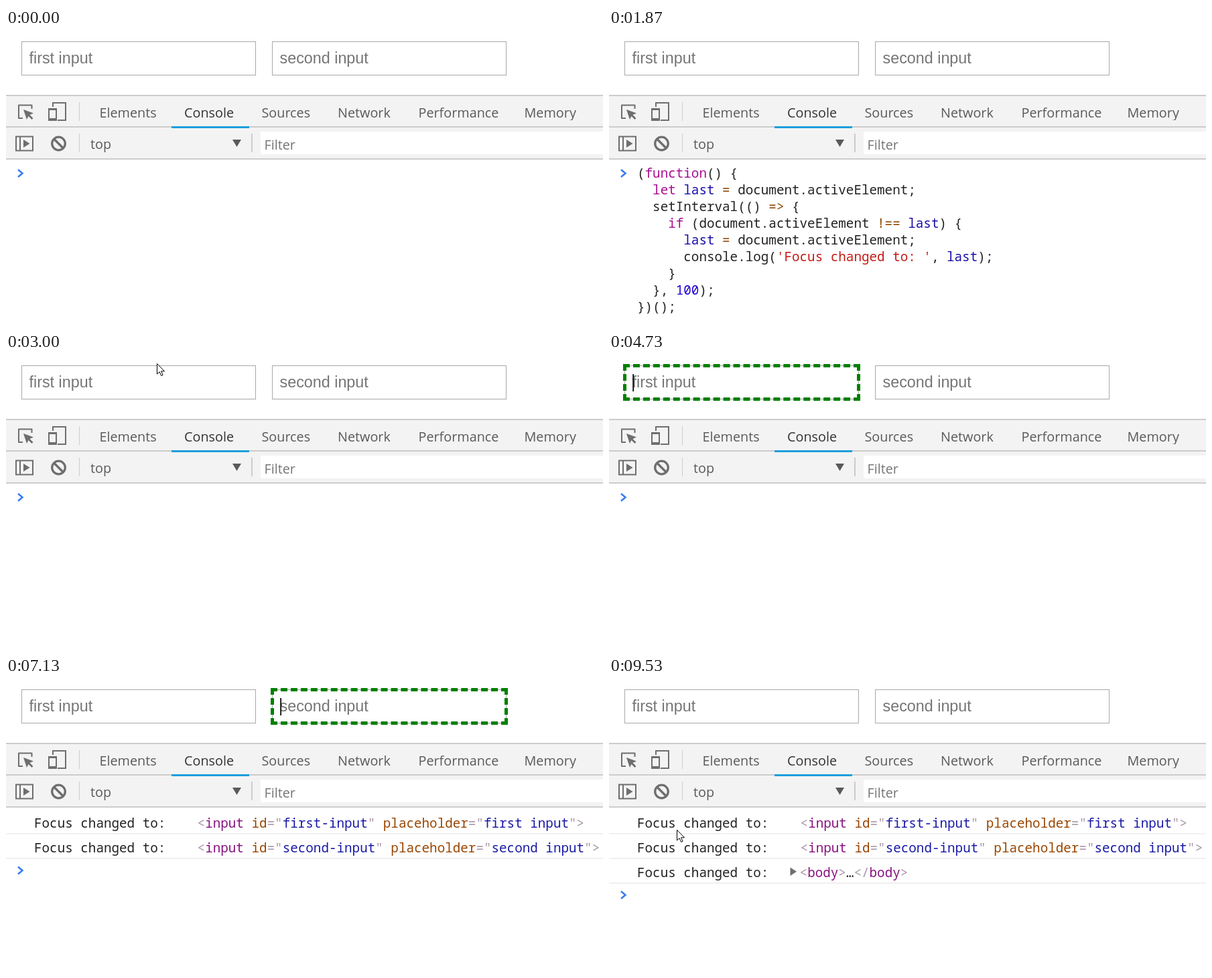
Recreate the animation shown at these times as an HTML page with a canvas. Size 891x443 px, loop 9.67 s.

```html
<!DOCTYPE html>
<html lang="en">
<head>
<meta charset="utf-8">
<title>Logging focus changes in the console</title>
<style>
  html, body { margin: 0; width: 100%; height: 100%; overflow: hidden; background: #fff; }
  canvas { display: block; }
</style>
</head>
<body>
<canvas id="stage" width="891" height="443"></canvas>
<script>
const ctx = document.getElementById('stage').getContext('2d');
const LOOP = 9670, TICK = 200 / 3;
const MONO = '19.25px "Noto Sans Mono", "DejaVu Sans Mono", monospace';
const UI = '19.8px "Open Sans", "Noto Sans", sans-serif';
const FIELD = '23.33px "Liberation Sans", Arial, sans-serif';
const CHAR = 11.55, LINE = 25, ROW = 36.75;

// Token colours, picked by a one-letter key
const INK = {
  d: '#222', k: '#aa0d91', o: '#8f4600', v: '#1a0fa8', n: '#1c00cf', s: '#c41a16',
  t: '#881280', p: '#a894a6', a: '#994500', q: '#1a1aa6'
};

const CODE = [
  [0, 'd(', 'kfunction', 'd() {'],
  [2, 'klet', 'v last', 'o =', 'd document.activeElement;'],
  [2, 'dsetInterval(() ', 'o=>', 'd {'],
  [4, 'kif', 'd (document.activeElement ', 'o!==', 'v last', 'd) {'],
  [6, 'vlast', 'o =', 'd document.activeElement;'],
  [6, 'dconsole.log(', "s'Focus changed to: '", 'd, ', 'vlast', 'd);'],
  [4, 'd}'],
  [2, 'd}, ', 'n100', 'd);'],
  [0, 'd})();']
];

const inputTag = name => [
  'p<', 'tinput', 'a id', 'p="', 'q' + name + '-input', 'p"',
  'a placeholder', 'p="', 'q' + name + ' input', 'p">'
];
const LOGS = [
  { at: 4800, x: 285.6, tag: inputTag('first') },
  { at: 6200, x: 285.6, tag: inputTag('second') },
  { at: 7400, x: 284.6, tag: ['p<', 'tbody', 'p>', 'd…', 'p</', 'tbody', 'p>'], arrow: true }
];

// Spans during which each blinking caret is lit
const BLINK = {
  prompt: [[800, 1330], [3130, 3670], [4200, 4730]],
  code: [[1330, 1870]],
  first: [[4730, 5330], [5800, 6130]],
  second: [[6130, 6670], [7130, 7330]]
};

const within = (t, a, b) => t >= a && t < b;
const lit = (t, name) => BLINK[name].some(([a, b]) => within(t, a, b));

function rect(x, y, w, h, color) {
  ctx.fillStyle = color;
  ctx.fillRect(x, y, w, h);
}

function text(str, x, y, font, color) {
  ctx.font = font;
  ctx.fillStyle = color;
  ctx.fillText(str, x, y);
}

function tokens(list, x, y) {
  for (const item of list) {
    const str = item.slice(1);
    text(str, x, y, MONO, INK[item[0]]);
    x += str.length * CHAR;
  }
}

function path(points, close) {
  ctx.beginPath();
  points.forEach(([x, y]) => ctx.lineTo(x, y));
  if (close) ctx.closePath();
}

function fillPath(points, color) {
  path(points, true);
  ctx.fillStyle = color;
  ctx.fill();
}

function strokePath(points, color, width, close) {
  path(points, close);
  ctx.strokeStyle = color;
  ctx.lineWidth = width;
  ctx.stroke();
}

function frame(x, y, w, h, color, width) {
  ctx.strokeStyle = color;
  ctx.lineWidth = width;
  ctx.strokeRect(x, y, w, h);
}

function chevron(x, y, color) {
  strokePath([[x, y - 5.5], [x + 6.5, y], [x, y + 5.5]], color, 2.5);
}

// Evenly spaced dashes that begin and end on the corners
function dashes(length, place) {
  const size = 10, count = Math.round((length + 5) / 15);
  const step = (length - size) / (count - 1);
  for (let i = 0; i < count; i++) place(i * step, size);
}

function focusRing(x, y, w, h) {
  const green = '#008000', b = 5;
  dashes(w, (d, s) => {
    rect(x + d, y, s, b, green);
    rect(x + d, y + h - b, s, b, green);
  });
  dashes(h, (d, s) => {
    rect(x, y + d, b, s, green);
    rect(x + w - b, y + d, b, s, green);
  });
}

function drawField(x, label, focused, caret) {
  frame(x + 0.5, 20.5, 349, 50, '#a9a9a9', 1);
  text(label, x + 11.5, 53, FIELD, '#757575');
  if (focused) focusRing(x - 2, 18, 354, 55);
  if (caret) rect(x + 12.3, 33, 1.7, 26, '#000');
}

function drawIcons() {
  const c = '#6e6e6e', bar = '#f3f3f3';
  // element picker
  ctx.lineJoin = 'round';
  strokePath([[25, 135], [19, 135], [19, 115.5], [38.5, 115.5], [38.5, 121]], c, 2);
  ctx.lineJoin = 'miter';
  fillPath([[26, 122], [41, 127.5], [35.5, 130], [40.5, 135], [38.5, 137], [33.5, 132], [31, 137]], c);
  // device toggle
  frame(70, 112, 19, 26, c, 2);
  rect(62, 118, 15, 22, bar);
  rect(63, 120, 13, 19, c);
  rect(65, 123, 9, 12, bar);
  // sidebar toggle
  frame(15, 162.5, 25, 21, c, 2);
  rect(20, 162, 2, 22, c);
  fillPath([[26, 167], [35.5, 173], [26, 179]], c);
  // clear
  ctx.beginPath();
  ctx.arc(78.5, 173, 9.8, 0, 7);
  ctx.strokeStyle = c;
  ctx.lineWidth = 3.3;
  ctx.stroke();
  strokePath([[72, 166.5], [85, 179.5]], c, 3.3);
}

function drawToolbars(t) {
  rect(0, 100, 891, 97, '#f3f3f3');
  if (within(t, 8330, 8400)) rect(873, 102, 18, 46, '#e8e8e8');
  for (const y of [100, 147, 195]) rect(0, y, 891, 2, '#cccccc');
  if (within(t, 8330, 8400)) rect(873, 147, 18, 1, '#e8e8e8');
  rect(247, 147, 116, 3, '#1a9fdc');
  rect(109, 111, 1, 28, '#ccc');
  rect(109, 158, 1, 28, '#ccc');
  rect(366, 158, 2, 28, '#ccc');
  rect(380, 155, 511, 34, '#fff');
  drawIcons();

  ctx.save();
  ctx.beginPath();
  ctx.rect(0, 102, 891, 36);
  ctx.clip();
  const tabs = { Elements: 139.5, Console: 266, Sources: 381.5, Network: 495, Performance: 615.5, Memory: 773.5 };
  for (const name in tabs) text(name, tabs[name], 134, UI, name === 'Console' ? '#333' : '#5a5a5a');
  ctx.restore();

  text('top', 126, 181, UI, '#5a5a5a');
  text('Filter', 385.5, 182, UI, '#757575');
  fillPath([[338, 167], [351, 167], [344.5, 178]], '#5a5a5a');
}

function drawCode(dy) {
  CODE.forEach(([indent, ...list], i) => tokens(list, 42 + indent * CHAR, 224 + dy + i * LINE));
}

function drawConsole(t) {
  if (within(t, 1330, 2070)) {
    chevron(18, 217.5, '#367cf1');
    drawCode(0);
    if (lit(t, 'code')) rect(100, 405, 1, 25, '#000');
    return;
  }
  if (within(t, 2070, 3000)) {
    const dy = t < 2130 ? 3 : -3;
    chevron(15, 217.5 + dy, '#9a9a9a');
    drawCode(dy);
    if (t >= 2130) text('undefined', 42, 458, MONO, '#808080');
    return;
  }
  const shown = LOGS.filter(log => t >= log.at);
  shown.forEach((log, i) => {
    const y = 227 + i * ROW;
    tokens(['dFocus changed to:'], 42, y);
    tokens(log.tag, log.x, y);
    if (log.arrow) fillPath([[270.5, y - 14], [280, y - 7.8], [270.5, y - 1.5]], '#6e6e6e');
    rect(0, Math.floor(235.5 + i * ROW), 891, 2, '#f0f0f0');
  });
  chevron(18, 217.5 + shown.length * ROW, '#367cf1');
  if (lit(t, 'prompt')) rect(42, 205, 2, 25, '#000');
}

// Stepped move: progress changes once per tick
function glide(t, start, steps, from, to, ease) {
  const k = Math.floor((t - start + 4) / TICK);
  const u = ease(Math.min(1, Math.max(0, k / steps)));
  return from.map((v, i) => Math.round(v + (to[i] - v) * u));
}

function pointer(t) {
  const soft = u => u * (2 - u), smooth = u => u * u * (3 - 2 * u);
  const rest = [225, 17];
  if (within(t, 600, 1330)) return glide(t, 600, 5, [243, 1], rest, soft);
  if (within(t, 2070, 3930)) return rest;
  if (within(t, 3930, 4065)) return glide(t, 3930, 1, [225, 10], [225, 3], soft);
  if (t >= 8730) return glide(t, 8730, 12, [243, 418], [101, 230], smooth);
  return null;
}

function drawPointer([x, y]) {
  const shape = [[0, 0], [0, 15.5], [3.6, 12.2], [6.2, 18], [8.6, 17], [6.1, 11.3], [11, 11.3]]
    .map(([a, b]) => [x + a + 0.5, y + b + 0.5]);
  fillPath(shape, '#fff');
  strokePath(shape, '#000', 1, true);
}

function draw(t) {
  rect(0, 0, 891, 443, '#fff');
  drawField(23, 'first input', within(t, 4730, 6130), lit(t, 'first'));
  drawField(397, 'second input', within(t, 6130, 7330), lit(t, 'second'));
  drawConsole(t);
  drawToolbars(t);
  const tip = pointer(t);
  if (tip) drawPointer(tip);
}

const begin = performance.now();
function tick() {
  draw((performance.now() - begin) % LOOP);
  requestAnimationFrame(tick);
}
tick();
</script>
</body>
</html>
```
